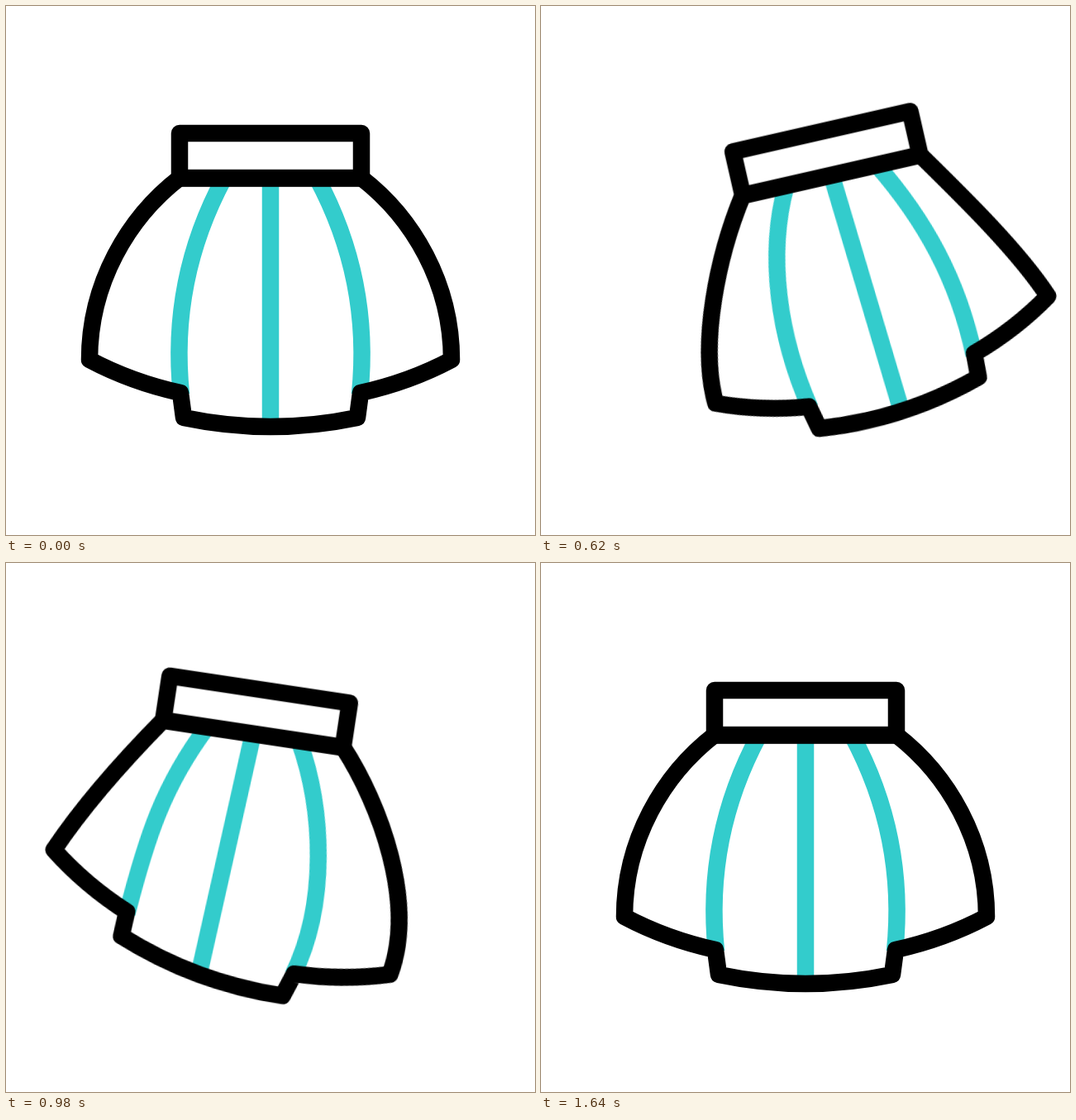
These frames come from a looping animation (640x640 px, 2.4 s). An HTML page:

```html
<!DOCTYPE html>
<html lang="en">
<head>
<meta charset="utf-8">
<title>Swinging skirt</title>
<style>
  html, body { margin: 0; width: 100%; height: 100%; overflow: hidden; background: #fff; }
  svg { display: block; width: 100%; height: 100%; }

  path, rect { fill: none; stroke: #000; stroke-width: 20.5; stroke-linejoin: round; }
  .stripe { stroke: #3cc; }

  g, path { animation: swing 2400ms cubic-bezier(.333, 0, .667, 1) infinite; }
  g { transform-origin: 0 67px; }
  path { animation-name: flare; }

  /* The whole skirt swings from a point above the waistband. */
  @keyframes swing {
    0% { transform: rotate(0deg); animation-timing-function: cubic-bezier(.45, 0, .667, 1); }
    23.08% { transform: rotate(-15deg); }
    38.46% { transform: rotate(9.75deg); }
    52.33% { transform: rotate(-5deg); }
    68.33%, 100% { transform: rotate(0deg); }
  }

  /* The cloth flares right, then left, slightly ahead of the swing. */
  @keyframes flare {
    0% { d: var(--rest); animation-timing-function: cubic-bezier(.45, 0, .667, 1); }
    19.67% { d: var(--right); }
    35.92% { d: var(--left); }
    49.13%, 100% { d: var(--rest); }
  }
</style>
</head>
<body>
<svg viewBox="-320 0 640 640">
  <g>
    <path class="stripe" id="stripeLeft"/>
    <path class="stripe" id="stripeMiddle"/>
    <path class="stripe" id="stripeRight"/>
    <path id="outline"/>
    <rect x="-110" y="154" width="220" height="54.5"/>
  </g>
</svg>
<script>
  // x is measured from the skirt's centre line; side is -1 (left) or 1 (right).
  const poses = {
    rest: { angle: 0, pivot: [0, 0] },
    right: { angle: -15.6, pivot: [11, 347] },
    left: { angle: 17.2, pivot: [0, 402] }
  };

  const rotate = (x, y, { angle, pivot: [px, py] }) => {
    const a = angle * Math.PI / 180, cos = Math.cos(a), sin = Math.sin(a);
    return [px + (x - px) * cos - (y - py) * sin, py + (x - px) * sin + (y - py) * cos];
  };

  // The waist stays put while the hem turns; a raised side hangs almost straight.
  function drape(pose) {
    const turn = (x, y) => rotate(x, y, pose);
    const slack = Math.abs(pose.angle);

    const sideHandles = side => {
      const [hemX, hemY] = turn(side * 219, 428);
      if (pose.angle * side < 0) {
        return [1 / 3, 2 / 3].map(t => [
          side * 110 * (1 - t) + hemX * t - side * 5,
          208 * (1 - t) + hemY * t + 8
        ]);
      }
      return [[side * (172 - slack * .6), 256 + slack * 1.2], turn(side * 219, 335)];
    };

    const stripe = side =>
      `M${side * 56} 208 C${side * 98} 286 ${turn(side * 118, 374)} ${turn(side * 108, 470)}`;

    const [leftTop, leftLow] = sideHandles(-1);
    const [rightTop, rightLow] = sideHandles(1);

    return {
      stripeLeft: stripe(-1),
      stripeMiddle: `M0 208 L${turn(0, 508)}`,
      stripeRight: stripe(1),
      outline: `M-110 208 C${leftTop} ${leftLow} ${turn(-219, 428)}
        Q${turn(-168, 455)} ${turn(-109, 468)} L${turn(-105, 498)}
        Q${turn(0, 520)} ${turn(105, 498)} L${turn(109, 468)}
        Q${turn(168, 455)} ${turn(219, 428)}
        C${rightLow} ${rightTop} 110 208 Z`.replace(/\s+/g, " ")
    };
  }

  for (const [name, pose] of Object.entries(poses)) {
    for (const [id, shape] of Object.entries(drape(pose))) {
      document.getElementById(id).style.setProperty(`--${name}`, `path("${shape}")`);
    }
  }
</script>
</body>
</html>
```
